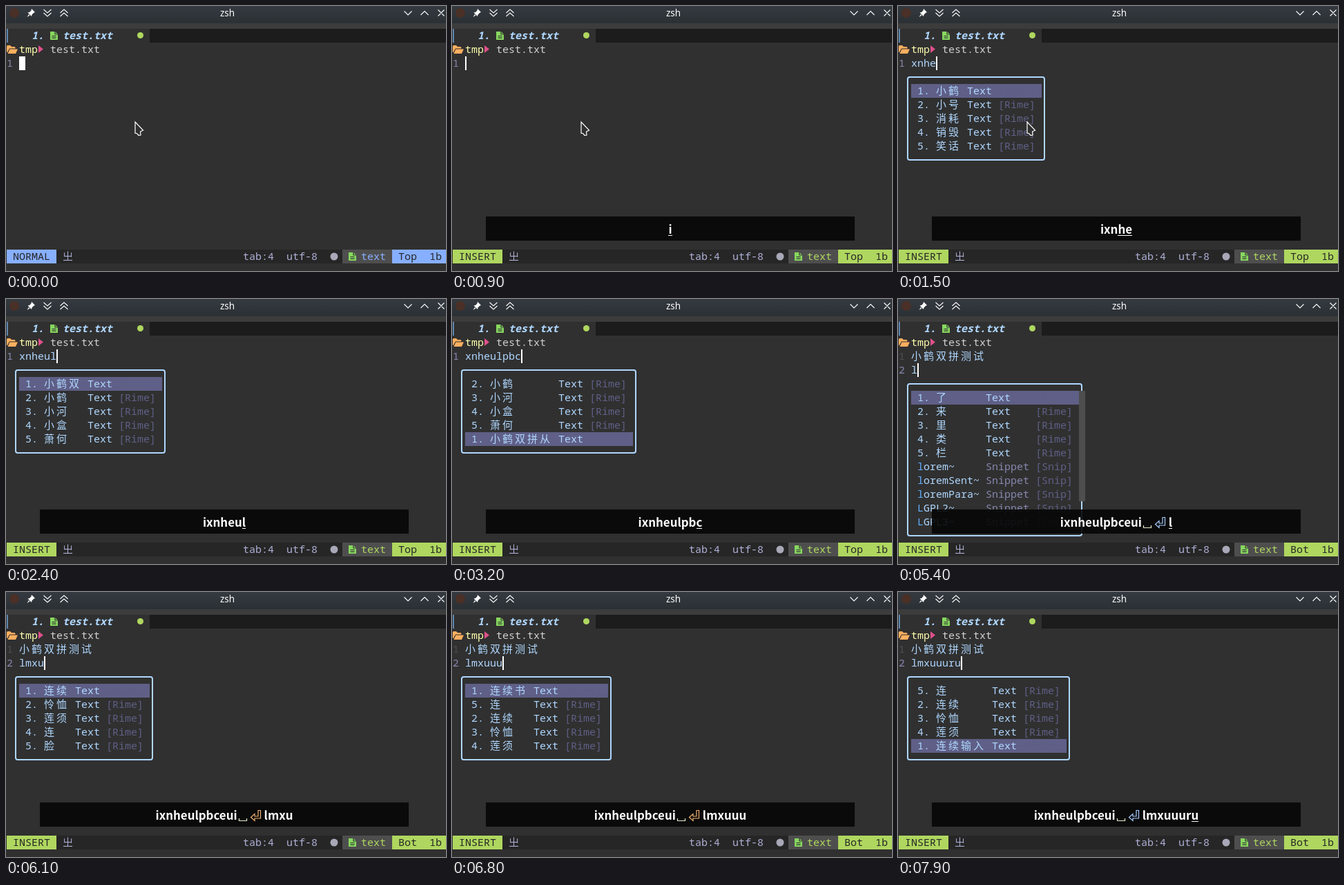
An HTML page that plays this animation: 637 px wide and 384 px high, repeating every 8 s.

```html
<!DOCTYPE html>
<html lang="en">
<head>
<meta charset="utf-8">
<title>Terminal input demo</title>
<style>
  html, body { margin: 0; width: 100%; height: 100%; overflow: hidden; background: #303030; }
  #stage { position: relative; width: 637px; height: 384px; overflow: hidden; }
  svg { display: block; }
  text { font: 15px "Noto Sans Mono", monospace; white-space: pre; }
  text.cjk { font-family: "Noto Sans CJK SC", "Noto Sans CJK JP", "Noto Sans CJK", sans-serif; letter-spacing: 3px; }
  text.tab { font-weight: bold; font-style: italic; }
  text.title { font: 13.5px "Noto Sans", sans-serif; }
  #keys {
    position: absolute; left: 49px; top: 305px; width: 534px; height: 35px;
    display: flex; justify-content: center; background: rgba(6, 6, 6, .9); color: #fff;
    font: bold 16.9px/35px "Noto Sans CJK SC", "Noto Sans CJK JP", "Noto Sans CJK", sans-serif;
  }
  #keys span { position: relative; flex: none; height: 35px; }
  #keys .fresh::after { content: ""; position: absolute; left: 0; right: 0; top: 27px; height: 1px; background: #fff; }
  #keys .space { width: 16px; }
  #keys .enter { width: 17px; margin-left: 2px; }
  #keys .enter + span { margin-left: 4px; }
  #keys path { fill: none; stroke-width: 1.2; }
</style>
</head>
<body>
<div id="stage">
  <svg width="637" height="384" viewBox="0 0 637 384">
    <defs>
      <linearGradient id="bar" x2="0" y2="1">
        <stop stop-color="#343a40"/><stop offset="1" stop-color="#2b3035"/>
      </linearGradient>
      <g id="file">
        <path d="M0 0H7L11 4V12H0Z" fill="#87d75f"/>
        <path d="M7 0V4H11M2.5 6.5H8.5M2.5 9.2H8.5" fill="none" stroke="#303030" stroke-width="1.2"/>
      </g>
    </defs>
    <rect width="637" height="384" fill="#303030"/>
    <rect width="637" height="25" fill="url(#bar)"/>
    <rect y="25" width="637" height="8" fill="#3c3c3c"/>
    <circle cx="12" cy="10" r="7" fill="#4a3026"/>
    <path d="M37 4L42 9L40 10L37.5 12.5L37 15L31.500 9.500L34 9L36.500 6.500ZM33 12L30.500 16L34.500 13.500Z" fill="#fcfcfc"/>
    <g fill="none" stroke="#fcfcfc" stroke-width="1.1">
      <path d="M54.500 5L60 10L65.500 5M54.500 10L60 15L65.500 10M78.500 10L84 5L89.500 10M78.500 15L84 10L89.500 15"/>
      <path d="M576.500 7.500L582 13L587.500 7.500M600.500 13L606 7.500L611.500 13M625.500 5.500L634.500 14.500M634.500 5.500L625.500 14.500"/>
    </g>
    <text class="title" x="320.500" y="15" text-anchor="middle" fill="#fcfcfc">zsh</text>

    <rect x="208" y="33" width="429" height="20" fill="#1c1c1c"/>
    <rect x="1" y="33" width="2" height="20" fill="#5f87af"/>
    <text class="tab" x="37" y="48" fill="#afd7ff">1.</text>
    <use href="#file" x="64" y="37"/>
    <text class="tab" x="82" y="48" fill="#afd7ff">test.txt</text>
    <circle cx="194.500" cy="42.500" r="4.500" fill="#afd75f"/>

    <path d="M1 67V58.500Q1 57 2.500 57H6L8 59H12Q13.500 59 13.500 60.500V61.500H5L2 67ZM2.500 69L5.500 62.500H17L14 69Z" fill="#ffaf5f"/>
    <text x="19" y="68" fill="#ffffaf">tmp</text>
    <path d="M47 57L54 62.500L47 68Z" fill="#e0508a"/>
    <text x="64" y="68" fill="#d0d0d0">test.txt</text>
    <g id="screen"></g>
  </svg>
  <div id="keys"></div>
</div>
<script>
const LOOP = 8000;
const PALE = '#afd7ff', MUTED = '#5f5f87', GREY = '#8787af', DARK = '#262626';
const FIRST_LINE = '小鹤双拼测试';
const XNHE = '2小鹤 3小河 4小盒 5萧何';
const LMXU = '5连 2连续 3怜恤 4莲须';
const RIME_L = '1了 2来 3里 4类 5栏';

// Each step: time, newly pressed keys (null keeps the underline, '' clears it), other changes.
const steps = [
  [0, null, { mode: 'NORMAL', line: 0, typed: '', menu: '', pointer: true }],
  [700, null, { mode: 'INSERT' }],
  [900, 'i'],
  [1200, 'xn', { typed: 'xn', menu: '1小 2笑 3校 4消 5效' }],
  [1400, 'h', { typed: 'xnh', menu: '1小孩 2小号 3消耗 4销毁 5笑话' }],
  [1500, '+e', { typed: 'xnhe', menu: '1小鹤 2小号 3消耗 4销毁 5笑话' }],
  [1600, null, { menu: '1小鹤 2小河 3小盒 4萧何 5小' }],
  [1700, ''],
  [2100, 'u', { typed: 'xnheu', menu: XNHE + ' 1小鹤是' }],
  [2200, null, { menu: '1小鹤是 ' + XNHE }],
  [2300, 'l', { typed: 'xnheul', menu: XNHE + ' 1小鹤双', pointer: false }],
  [2400, null, { menu: '1小鹤双 ' + XNHE }],
  [2500, 'p', { typed: 'xnheulp', menu: XNHE + ' 1小鹤双平' }],
  [2600, null, { menu: '1小鹤双平 ' + XNHE }],
  [2700, 'b', { typed: 'xnheulpb', menu: XNHE + ' 1小鹤双拼' }],
  [2800, null, { menu: '1小鹤双拼 ' + XNHE }],
  [2900, ''],
  [3100, 'c', { typed: 'xnheulpbc', menu: XNHE + ' 1小鹤双拼从' }],
  [3300, 'e', { typed: 'xnheulpbce', menu: XNHE + ' 1小鹤双拼测' }],
  [3400, null, { menu: '1小鹤双拼测 ' + XNHE }],
  [3500, 'u', { typed: 'xnheulpbceu', menu: XNHE + ' 1小鹤双拼测是' }],
  [3600, '+i', { typed: 'xnheulpbceui', menu: '1小鹤双拼测试 ' + XNHE }],
  [3800, ''],
  [4200, ' '],
  [4300, null, { typed: FIRST_LINE, menu: '' }],
  [4400, ''],
  [4900, '\n', { line: 1, typed: '' }],
  [5100, ''],
  [5300, 'l', { typed: 'l', menu: RIME_L }],
  [5400, null, { menu: RIME_L + ' lorem~ loremSent~ loremPara~ LGPL2~ LGPL3~' }],
  [5500, ''],
  [5600, 'm', { typed: 'lm', menu: '1连 2脸 3练 4联 5恋' }],
  [5800, 'x', { typed: 'lmx', menu: '1连续 2联想 3连线 4练习 5连' }],
  [5900, '+u', { typed: 'lmxu', menu: '1连续 2怜恤 3莲须 4连 5脸' }],
  [6100, ''],
  [6500, 'u', { typed: 'lmxuu', menu: LMXU + ' 1连续书' }],
  [6600, '+u', { typed: 'lmxuuu' }],
  [6700, null, { menu: '1连续书 ' + LMXU }],
  [6800, ''],
  [7700, 'r', { typed: 'lmxuuur', menu: LMXU + ' 1连续书人' }],
  [7800, null, { menu: '1连续书人 ' + LMXU }],
  [7900, 'u', { typed: 'lmxuuuru', menu: LMXU + ' 1连续输入' }],
];

const states = [];
steps.reduce((prev, [at, press, change]) => {
  const state = { ...prev, ...change, at };
  if (press !== null) {
    const joins = press[0] === '+';
    const added = joins ? press.slice(1) : press;
    state.keys = prev.keys + added;
    state.fresh = added.length + (joins ? prev.fresh : 0);
  }
  states.push(state);
  return state;
}, { keys: '', fresh: 0 });

const isCjk = s => /[\u3400-\u9fff]/.test(s);
const rect = (x, y, w, h, fill) => `<rect x="${x}" y="${y}" width="${w}" height="${h}" fill="${fill}"/>`;
const label = (x, top, s, fill) =>
  `<text x="${x}" y="${top + 15}" fill="${fill}"${isCjk(s) ? ' class="cjk"' : ''}>${s}</text>`;
const cells = s => s.length * (isCjk(s) ? 2 : 1);

function drawMenu(spec, line) {
  if (!spec) return '';
  const items = spec.split(' ').map(s => {
    const rime = /^\d/.test(s);
    return { rime, num: s[0], word: rime ? s.slice(1) : s, kind: rime ? 'Text' : 'Snippet' };
  });
  const width = Math.max(...items.map(i => cells(i.word) + (i.rime ? 3 : 0)));
  const kindX = 28 + 9 * (width + 1);
  const sourceX = kindX + 9 * (Math.max(...items.map(i => i.kind.length)) + 1);
  const end = sourceX + 63, top = 102 + 20 * line;
  let out = `<rect x="14" y="${top + 1}" width="${end - 10}" height="${items.length * 20 + 20}" rx="3" fill="#303030" stroke="${PALE}" stroke-width="2"/>`;
  items.forEach((item, i) => {
    const y = top + 11 + 20 * i;
    if (item.rime) {
      if (item.num === '1') out += rect(19, y, end - 19, 20, MUTED);
      out += label(28, y, item.num + '.', PALE) + label(55, y, item.word, PALE);
    } else {
      out += label(28, y, item.word[0], '#5fafff') + label(37, y, item.word.slice(1), PALE);
    }
    out += label(kindX, y, item.kind, item.rime ? PALE : GREY);
    out += label(sourceX, y, item.rime ? '[Rime]' : '[Snip]', MUTED);
  });
  if (items.length > 5) out += rect(end, top + 11, 9, 160, '#4e4e4e');
  return out;
}

function drawEditor({ mode, line, typed }) {
  const top = 73 + 20 * line;
  let out = label(1, top, line + 1, GREY) + label(19, top, typed, PALE);
  if (line) out += label(1, 73, '1', '#4e4e4e') + label(19, 73, FIRST_LINE, PALE);
  return out + rect(19 + 9 * cells(typed), top, mode === 'NORMAL' ? 9 : 2, 20, '#fff');
}

function drawStatus({ mode, line }) {
  const accent = mode === 'NORMAL' ? '#87afff' : '#afd75f', info = '#afafd7';
  return rect(1, 353, 72, 20, accent) + rect(73, 353, 414, 20, DARK) +
    rect(487, 353, 72, 20, '#4e4e4e') + rect(559, 353, 78, 20, accent) +
    label(10, 353, mode, DARK) + label(82, 353, '㞢', info) +
    label(343, 353, 'tab:4', info) + label(406, 353, 'utf-8', info) +
    '<circle cx="475" cy="363" r="5.5" fill="#a8a8b8"/><use href="#file" x="496" y="357"/>' +
    label(514, 353, 'text', accent) +
    label(568, 353, line ? 'Bot' : 'Top', DARK) + label(613, 353, '1b', DARK);
}

const pointer = '<path d="M187 168V184.500L189.500 184.500L192 187.500L195 187L194.500 182L198.500 180Z" fill="#303030" stroke="#fff" stroke-width="1.2"/>';

function drawKeys({ keys, fresh }) {
  const split = keys.length - fresh;
  const tint = /mxu+$/.test(keys) ? '#f0b070' : '#a8ccff';
  const icon = (d, color) => `<svg width="17" height="35"><path d="${d}" stroke="${color}"/></svg>`;
  const part = (s, cls) => (s.match(/[a-z]+| |\n/g) || []).map(key =>
    key === ' ' ? `<span class="space ${cls}">${icon('M2.500 23V26.500H13.500V23', '#e4ecc8')}</span>` :
    key === '\n' ? `<span class="enter ${cls}">${icon('M12 11.500H15.500V23H7V26.500L1.500 21.500L7 16.500V20H12Z', tint)}</span>` :
    `<span class="${cls}">${key}</span>`).join('');
  return part(keys.slice(0, split), '') + part(keys.slice(split), 'fresh');
}

const screenEl = document.getElementById('screen');
const keysEl = document.getElementById('keys');
let shown;

function render(state) {
  screenEl.innerHTML = drawStatus(state) + drawEditor(state) +
    drawMenu(state.menu, state.line) + (state.pointer ? pointer : '');
  keysEl.innerHTML = drawKeys(state);
  keysEl.style.display = state.keys ? 'flex' : 'none';
}

function tick() {
  const time = performance.now() % LOOP;
  const state = states.filter(s => s.at <= time).pop();
  if (state !== shown) render(shown = state);
  requestAnimationFrame(tick);
}
tick();
</script>
</body>
</html>
```
